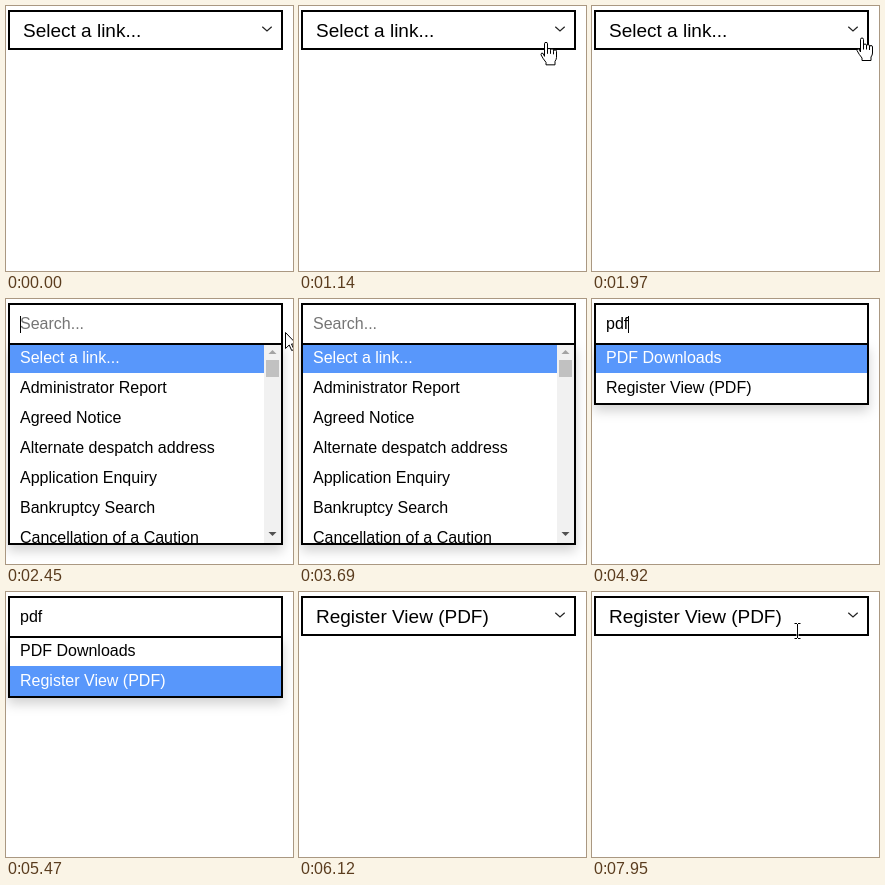
Recreate the animation shown at these times as an HTML page. Size 287x265 px, loop 7.99 s.

```html
<!DOCTYPE html>
<html lang="en">
<head>
<meta charset="utf-8">
<title>Searchable select</title>
<style>
  html, body { margin: 0; width: 100%; height: 100%; overflow: hidden; background: #fff; }
  svg { display: block; width: 100vw; height: 100vh; font-family: "Liberation Sans", Arial, sans-serif; }
  .label { font-size: 19px; }
  .item, .query { font-size: 16px; }
  #panel { filter: drop-shadow(0 6px 6px rgba(0, 0, 0, .175)); }
</style>
</head>
<body>
<svg viewBox="0 0 287 265">
  <defs>
    <clipPath id="clip"><rect id="clipBox" x="4" y="46" width="271" height="198"/></clipPath>
  </defs>

  <g id="closed">
    <rect x="3" y="5" width="273" height="38" fill="#fff" stroke="#000" stroke-width="2"/>
    <text id="label" class="label" x="17" y="31"></text>
    <path d="M256.3 20.7l4.7 4.3 4.7-4.3" fill="none" stroke="#222" stroke-width="1.2"/>
  </g>

  <g id="open">
    <rect id="panel" x="2" y="44" width="275" fill="#000"/>
    <rect x="3" y="5" width="273" height="40" fill="#fff" stroke="#000" stroke-width="2"/>
    <rect id="sheet" x="4" y="46" width="271" fill="#fff"/>
    <g clip-path="url(#clip)">
      <rect id="mark" x="4" height="30" fill="#5897fb"/>
      <g id="items"></g>
    </g>
    <g id="scroll">
      <rect x="258" y="46" width="17" height="198" fill="#f1f1f1"/>
      <path d="M262.5 55l4-4 4 4z" fill="#a3a3a3"/>
      <path d="M262.5 233l4 4 4-4z" fill="#505050"/>
      <rect id="thumb" x="260" y="61" width="13" fill="#c1c1c1"/>
    </g>
    <text id="query" class="query" x="14" y="30"></text>
    <rect id="caret" y="17" width="1" height="17"/>
  </g>

  <g id="hand" fill="#fff" stroke="#000" stroke-linejoin="round">
    <path d="M4.500 15V2.500a1.500 1.500 0 0 1 3 0V8.500a1.500 1.500 0 0 1 3 0v.5a1.500 1.500 0 0 1 3 0v1a1.500 1.500 0 0 1 3 0V16q0 2-1.500 4v3.500h-9V21q-3-3.500-5-7.500q0-2.500 2-1.500z"/>
    <path d="M7.500 8v4.500M10.500 9v3.500M13.500 10v3" fill="none"/>
  </g>
  <path id="arrow" d="M.5.5v16l3.700-3.500 2.500 5.500 2.300-1-2.500-5.500h5z" fill="#fff" stroke="#000"/>
  <g id="beam" fill="none">
    <path d="M-3 -7.500h2l1 1 1-1h2M0-6.500v13M-3 7.500h2l1-1 1 1h2" stroke="#fff" stroke-width="2.500" opacity=".7"/>
    <path d="M-3 -7.500h2.500M.5-7.500h2.500M0-7v14M-3 7.500h2.500M.5 7.500h2.500" stroke="#000"/>
  </g>
</svg>

<script>
const LOOP = 7990;
const $ = id => document.getElementById(id);
const set = (id, name, value) => $(id).setAttribute(name, value);
const show = (id, on) => set(id, "visibility", on ? "visible" : "hidden");

const ALL = ["Select a link...", "Administrator Report", "Agreed Notice", "Alternate despatch address",
  "Application Enquiry", "Bankruptcy Search", "Cancellation of a Caution"];
const WITH_P = ["Administrator Report", "Alternate despatch address", "Application Enquiry",
  "Bankruptcy Search", "Cancellation of Official Search of\nPart (OS2)", "Change of Property Description"];
const WITH_PD = ["PDF Downloads", "Register View (PDF)"];

// Each state of the open list: start time, typed text, caret x, options, thumb height
const STATES = [
  { t: 2070, text: "", caret: 14, list: ALL, thumb: 17 },
  { t: 3970, text: "p", caret: 22, list: WITH_P, thumb: 38 },
  { t: 4150, text: "pd", caret: 31, list: WITH_PD, thumb: 0 },
  { t: 4920, text: "pdf", caret: 36, list: WITH_PD, thumb: 0 }
];
const OPEN = 2070, CLOSE = 6120, NEXT_ROW = 5320;
const CARET_OFF = [[2070, 2100], [2640, 3170], [3690, 3970], [4710, 4920], [5470, 6030]];

// Pointer moves: start, arrival, number of steps, shape, from, to
const MOVES = [
  { t: 850, end: 850, n: 1, shape: "arrow", from: [206, 48], to: [206, 48] },
  { t: 907, end: 1250, n: 7, shape: "hand", from: [213, 42], to: [255, 32] },
  { t: 1880, end: 1970, n: 4, shape: "hand", from: [257, 32], to: [264, 31] },
  { t: 2100, end: 2100, n: 1, shape: "beam", from: [271.5, 32], to: [271.5, 32] },
  { t: 2270, end: 2300, n: 2, shape: "beam", from: [266.5, 31], to: [262.5, 31] },
  { t: 2450, end: 2450, n: 1, shape: "arrow", from: [279, 33], to: [279, 33] },
  { t: 2500, shape: null },
  { t: 7610, end: 7700, n: 3, shape: "hand", from: [262, 38], to: [197, 37] },
  { t: 7950, end: 7950, n: 1, shape: "beam", from: [205.5, 39], to: [205.5, 39] }
];

const current = (rows, t) => rows.filter(r => r.t <= t).pop();

let shownRows = "";
function drawRows(list, active, width) {
  const key = list.join() + active;
  if (key === shownRows) return;
  shownRows = key;
  $("items").textContent = "";
  let y = 44;
  list.forEach((item, i) => {
    const lines = item.split("\n");
    lines.forEach((line, k) => {
      const el = document.createElementNS("http://www.w3.org/2000/svg", "text");
      el.setAttribute("class", "item");
      el.setAttribute("x", 14);
      el.setAttribute("y", y + 20 + 18 * k);
      el.setAttribute("fill", i === active ? "#fff" : "#000");
      el.textContent = line;
      $("items").append(el);
    });
    if (i === active) {
      set("mark", "y", y);
      set("mark", "width", width);
    }
    y += 12 + 18 * lines.length;
  });
}

function drawOpen(t) {
  const s = current(STATES, t);
  const long = s.thumb > 0;
  const bottom = long ? 244 : 104;
  set("panel", "height", bottom + 2 - 44);
  set("sheet", "height", bottom - 46);
  set("clipBox", "height", bottom - 46);
  drawRows(s.list, t >= NEXT_ROW ? 1 : 0, long ? 254 : 271);
  show("scroll", long);
  set("thumb", "height", s.thumb);
  $("query").textContent = s.text || "Search...";
  set("query", "fill", s.text ? "#000" : "#757575");
  set("caret", "x", s.caret);
  show("caret", !CARET_OFF.some(([a, b]) => t >= a && t < b));
}

function drawPointer(t) {
  const m = current(MOVES, t);
  for (const id of ["hand", "arrow", "beam"]) show(id, m && m.shape === id);
  if (!m || !m.shape) return;
  let p = 1;
  if (m.n > 1) {
    const gap = (m.end - m.t) / (m.n - 1);
    p = Math.min(1, Math.floor((t - m.t) / gap + 1e-6) / (m.n - 1));
  }
  const at = k => m.from[k] + (m.to[k] - m.from[k]) * p;
  set(m.shape, "transform", `translate(${at(0)} ${at(1)})`);
}

function draw(t) {
  const open = t >= OPEN && t < CLOSE;
  $("open").style.display = open ? "" : "none";
  $("closed").style.display = open ? "none" : "";
  if (open) drawOpen(t);
  else $("label").textContent = t < OPEN ? "Select a link..." : "Register View (PDF)";
  drawPointer(t);
}

let start;
function tick(now) {
  start ??= now;
  draw((now - start) % LOOP);
  requestAnimationFrame(tick);
}
draw(0);
requestAnimationFrame(tick);
</script>
</body>
</html>
```
